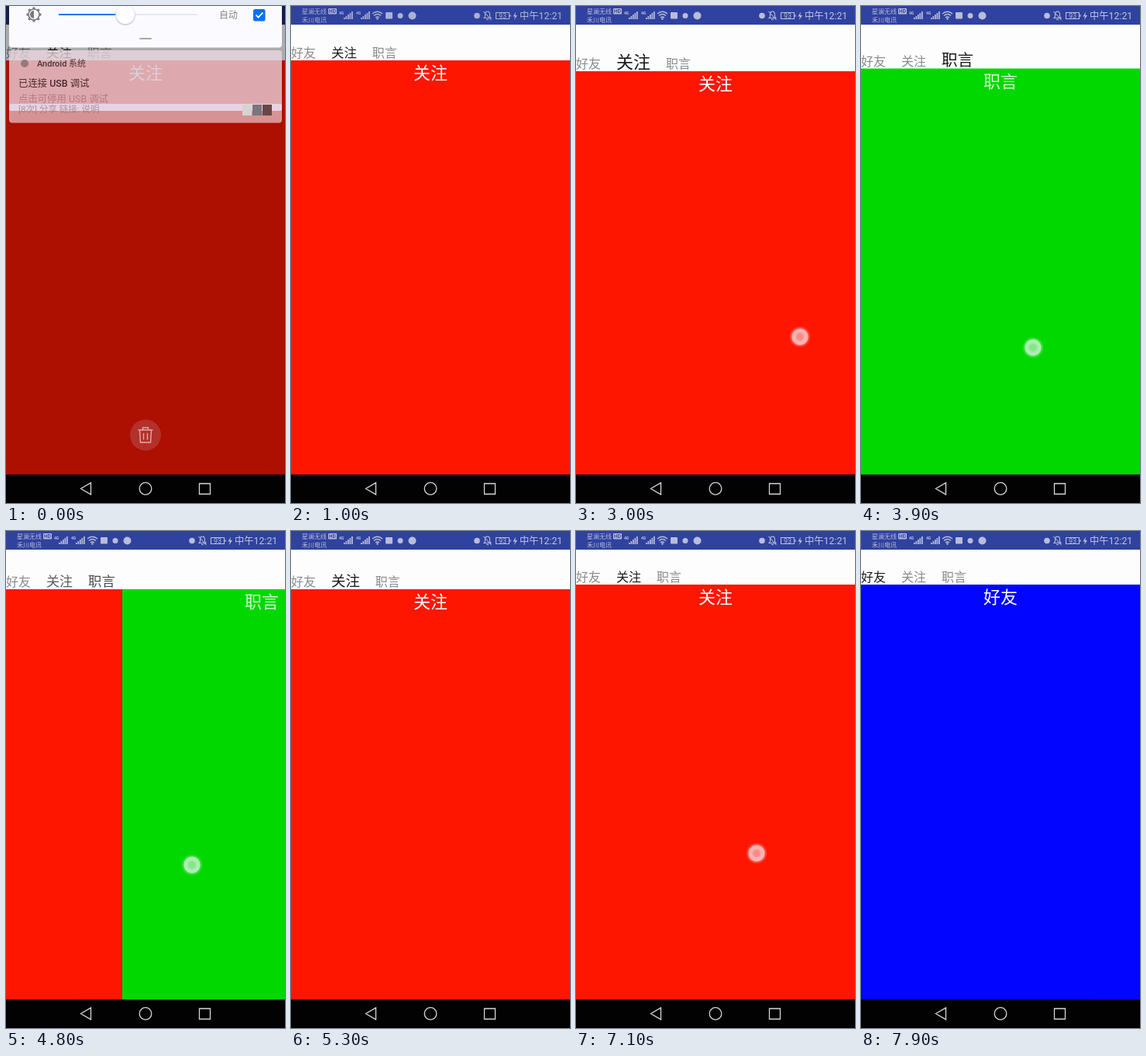
These frames come from a looping animation (360 px wide and 640 px high, 8 s). An HTML page with a canvas:

```html
<!DOCTYPE html>
<html lang="zh">
<head>
<meta charset="utf-8">
<style>
html, body { margin: 0; width: 100%; height: 100%; overflow: hidden; background: #000; }
canvas { display: block; width: 360px; height: 640px; }
</style>
</head>
<body>
<canvas id="stage" width="360" height="640"></canvas>
<script>
const ctx = document.getElementById('stage').getContext('2d');
const LOOP = 8000, STEP = 100, BOTTOM = 603.5;
const FONT = 'Roboto, "Noto Sans CJK SC", "Noto Sans CJK", sans-serif';

const pages = [
  { name: '好友', fill: '#0205ff', ink: '#ffffff' },
  { name: '关注', fill: '#ff1600', ink: '#ffffff' },
  { name: '职言', fill: '#00d800', ink: '#d2fad2' }
];

// [time, value] tracks; the header follows slow vertical drags
const headerTrack = [[1400, 70], [2100, 80], [2700, 84], [3700, 84], [3900, 80.5], [4200, 75],
  [5700, 75], [6500, 84], [6700, 84], [7100, 69]];
const pageTrack = [[3000, 1], [3400, 2], [4400, 2], [5300, 1], [7500, 1], [7900, 0]];

// [start, end, x0, y0, x1, y1]
const touches = [
  [1300, 2800, 240, 356, 240, 378],
  [3000, 3300, 289, 426, 110, 430],
  [3700, 4200, 222, 447, 222, 429],
  [4400, 5000, 80, 430, 320, 430],
  [5700, 6500, 235, 408, 235, 426],
  [6700, 7300, 233, 431, 233, 407],
  [7500, 7800, 100, 420, 290, 420]
];

const lerp = (a, b, k) => a + (b - a) * k;
const linear = k => k;
const smooth = k => k * k * (3 - 2 * k);

function track(keys, t, ease) {
  if (t <= keys[0][0]) return keys[0][1];
  for (let i = 1; i < keys.length; i++) {
    const [t0, v0] = keys[i - 1], [t1, v1] = keys[i];
    if (t < t1) return lerp(v0, v1, ease((t - t0) / (t1 - t0)));
  }
  return keys[keys.length - 1][1];
}

function rect(x, y, w, h, fill, r = 0) {
  ctx.fillStyle = fill;
  ctx.beginPath();
  ctx.roundRect(x, y, w, h, r);
  ctx.fill();
}

function disc(x, y, r, fill) {
  ctx.fillStyle = fill;
  ctx.beginPath();
  ctx.arc(x, y, r, 0, 7);
  ctx.fill();
}

function stroke(path, color, width = 1) {
  ctx.strokeStyle = color;
  ctx.lineWidth = width;
  ctx.stroke(new Path2D(path));
}

function text(str, x, baseline, size, fill, align = 'left', weight = 400) {
  ctx.font = `${weight} ${size}px ${FONT}`;
  ctx.textAlign = align;
  ctx.fillStyle = fill;
  ctx.fillText(str, x, baseline);
}

function drawPages(top, pos) {
  pages.forEach((page, i) => {
    const x = Math.round((i - pos) * 360);
    if (Math.abs(x) >= 360) return;
    rect(x, 24, 360, BOTTOM - 24, page.fill);
    text(page.name, x + 180, top + 24.4, 22, page.ink, 'center');
  });
}

function drawTabs(top, pos) {
  rect(0, 24, 360, top - 24, '#fdfdfe');
  let x = 0;
  pages.forEach((page, i) => {
    const on = Math.max(0, 1 - Math.abs(pos - i));
    const size = 16 + (top - 69) * 0.4 * on;
    const grey = lerp(138, 26, on);
    text(page.name, x, top - 3.7, size, `rgb(${grey},${grey},${grey})`);
    x += size * 2 + 20;
  });
}

function drawSignal(x) {
  text('4G', x, 11, 5, '#bfc1de', 'left', 700);
  for (let i = 0; i < 5; i++) rect(x + 6 + i * 2.5, 15 - i * 2, 1.7, 2 + i * 2, '#b9bcda');
}

function drawStatus(t) {
  const back = '#2f429f', ink = '#b9bcda';
  rect(0, 0, 360, 24, back);
  if (t < 1000) return;
  ctx.save();
  ctx.globalAlpha = t < 1100 ? 0.9 : 1;
  text('星澜无线', 14, 9.6, 8, ink);
  text('禾川电讯', 14, 21, 8, ink);
  rect(48, 3, 11, 7.5, ink, 1);
  text('HD', 53.5, 9.2, 6.5, back, 'center', 700);
  drawSignal(62);
  drawSignal(84);
  stroke('M105 10q6.5-5.5 13 0M107 12.5q4.5-3.8 9 0M109 15q2.5-2 5 0', ink, 1.4);
  disc(111.5, 16.5, 1.2, ink);
  rect(122, 8, 9, 8.5, ink, 1);
  disc(141, 12.5, 3.5, ink);
  disc(156.5, 12.5, 5, ink);
  disc(240, 12.5, 3.8, ink);
  stroke('M249 15.5h9l-1.5-2v-3.5q-.5-3-3-3t-3 3v3.5zM252 17.5h3M248.5 7l10 11', ink, 1.1);
  stroke('M264.5 8.5h17v8h-17zM283 11v3', ink, 1.1);
  text('93', 273, 16, 9, ink, 'center');
  ctx.fillStyle = ink;
  ctx.fill(new Path2D('M290 7.5l-3.5 6h2.5l-1 4.5 4-6h-2.7z'));
  text('中午12:21', 295, 17, 12.3, '#c2c5dc');
  ctx.restore();
}

function drawNavigation() {
  rect(0, BOTTOM, 360, 640 - BOTTOM, '#020202');
  stroke('M109.5 614v15l-13-7.5zM249.5 615h14v13.5h-14zM187.8 621.5a7.8 7.8 0 1 0-15.6 0a7.8 7.8 0 1 0 15.6 0', '#d6d6d6', 1.3);
}

function drawTouch(t) {
  const touch = touches.find(([start, end]) => t >= start && t < end);
  if (!touch) return;
  const [start, end, x0, y0, x1, y1] = touch;
  const k = (t - start) / (end - start);
  const x = lerp(x0, x1, k), y = lerp(y0, y1, k);
  const glow = ctx.createRadialGradient(x, y, 0, x, y, 14);
  [[0, 0.5], [0.3, 0.55], [0.45, 0.7], [0.72, 0.7], [0.78, 0.3], [1, 0]]
    .forEach(([stop, alpha]) => glow.addColorStop(stop, `rgba(245,245,255,${alpha})`));
  disc(x, y, 14, glow);
}

function drawBrightness() {
  rect(4, -30, 352, 83.5, '#fbfbff', 4);
  const ink = '#77777c';
  for (let i = 0; i < 8; i++) {
    const a = i * Math.PI / 4, c = Math.cos(a), s = Math.sin(a);
    stroke(`M${36 + c * 7} ${11 + s * 7}L${36 + c * 9.5} ${11 + s * 9.5}`, ink, 3);
  }
  stroke('M43 11a7 7 0 1 0-14 0a7 7 0 1 0 14 0', ink, 1.6);
  ctx.fillStyle = ink;
  ctx.fill(new Path2D('M36 6a5 5 0 0 0 0 10z'));
  rect(68, 10, 86, 2, '#2478e6');
  rect(154, 10, 93, 2, '#e4e6f2');
  disc(154, 12, 13, '#d3d3e2');
  disc(154, 11, 12, '#fefefe');
  text('自动', 275, 16, 12, '#858588');
  rect(319, 4, 15.5, 15.5, '#0870f2', 2.5);
  stroke('M322.5 11.5l3 3.2 6-6.2', '#fff', 1.7);
  rect(172, 41, 16, 2, '#a8a8aa', 1);
}

function drawNotification() {
  rect(4, 57, 352, 93.5, 'rgba(238,222,230,.64)', 4);
  rect(4, 57, 352, 78, 'rgba(232,208,222,.35)', 3);
  rect(4, 126, 352, 9, 'rgba(236,228,250,.7)', 2);
  disc(24, 74, 5, '#98787c');
  text('Android 系统', 40, 78, 11, '#4a3236', 'left', 500);
  text('已连接 USB 调试', 16, 103.5, 12.4, '#482a2c', 'left', 500);
  text('点击可停用 USB 调试', 16, 123.5, 12.4, '#b07c80');
  text('[8次] 分享 链接: 说明', 16, 137, 11.5, 'rgba(140,105,115,.6)');
  rect(305, 127, 12, 14, '#d8d2d2');
  rect(318, 127, 12, 14, '#77777c');
  rect(331, 127, 12, 14, '#6b4648');
}

function drawTrash() {
  disc(180, 552.5, 20, '#b4302a');
  stroke('M170.5 546h19M176.5 546v-3h7v3M172.5 546.5l1 15.5h13l1-15.5M177.5 550v8.5M182.5 550v8.5', '#e0aaa8', 1.4);
}

function drawShade(t) {
  if (t >= 500) return;
  const k = (1 - t / 500) ** 2;
  rect(0, 0, 360, BOTTOM, `rgba(0,0,0,${0.32 * k})`);
  rect(0, 0, 360, 24, `rgba(16,18,60,${0.6 * k})`);
  ctx.save();
  ctx.globalAlpha = k;
  drawTrash();
  ctx.translate(0, -t * 0.4);
  drawNotification();
  ctx.globalAlpha = 1;
  drawBrightness();
  ctx.restore();
}

function draw(t) {
  const top = track(headerTrack, t, linear);
  const pos = track(pageTrack, t, smooth);
  drawPages(top, pos);
  drawTabs(top, pos);
  drawStatus(t);
  drawShade(t);
  drawTouch(t);
  drawNavigation();
}

const begin = performance.now();
function tick() {
  const t = (performance.now() - begin) % LOOP;
  draw(Math.floor(t / STEP) * STEP);
  requestAnimationFrame(tick);
}
tick();
</script>
</body>
</html>
```
